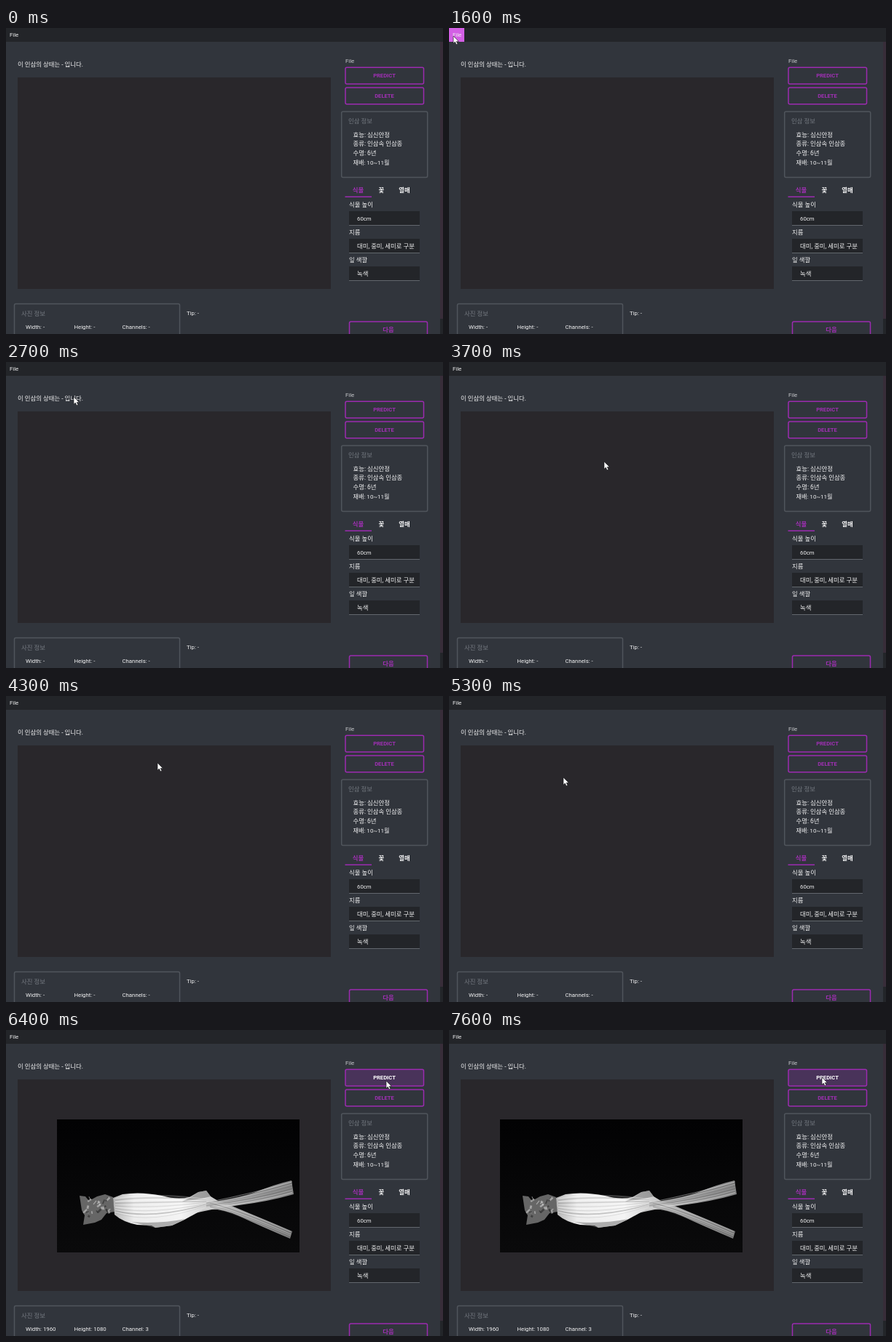
An HTML page that plays this animation: 600 by 421 pixels, repeating every 8 s.

```html
<!DOCTYPE html>
<html lang="ko">
<head>
<meta charset="utf-8">
<title>인삼 정보</title>
<style>
  html, body { margin: 0; width: 100%; height: 100%; overflow: hidden; background: #31353c; }
  svg { display: block; width: 100vw; height: 100vh; }
  text { font: 7.8px Roboto, "Noto Sans CJK KR", "Noto Sans CJK", sans-serif; fill: #f2f2f3; }
  .ko { font-size: 8.4px; }
  .dim { fill: #747980; }
  .soft { fill: #c9cbce; }
  .bold { font-weight: 700; text-anchor: middle; }
  .accent { fill: #a030b4; }
  .dark { fill: #232529; }
  .group { fill: none; stroke: #50555c; stroke-width: 1.5; }
  .button rect { fill: transparent; stroke: #9c2bb0; stroke-width: 1.5; }
  .button text { fill: #a030b4; font-size: 7.6px; }
  .button.hover rect { fill: #49335a; }
  .button.hover text { fill: #fff; }
  .line { stroke: #62676d; }
</style>
</head>
<body>
<svg viewBox="0 0 600 421">
  <defs>
    <linearGradient id="backdrop" x2="0" y2="1">
      <stop stop-color="#020203"/><stop offset="1" stop-color="#0a0a0b"/>
    </linearGradient>
    <linearGradient id="flesh">
      <stop stop-color="#b5b5b5"/><stop offset=".2" stop-color="#ececec"/>
      <stop offset=".65" stop-color="#f4f4f4"/><stop offset="1" stop-color="#c4c4c4"/>
    </linearGradient>
    <linearGradient id="branch">
      <stop stop-color="#f0f0f0"/><stop offset=".4" stop-color="#c2c2c2"/><stop offset="1" stop-color="#8c8c8c"/>
    </linearGradient>
    <filter id="soften"><feGaussianBlur stdDeviation=".7"/></filter>
    <clipPath id="photoArea"><rect x="70" y="123" width="333" height="183"/></clipPath>
  </defs>

  <rect width="600" height="421" fill="#31353c"/>
  <rect class="dark" width="600" height="19"/>
  <rect x="596" y="19" width="4" height="381" fill="#382d39"/>
  <rect class="dark" x="596" y="400" width="4" height="21"/>
  <rect id="fileHover" width="21" height="19" fill="#d35fe5"/>
  <text x="5" y="12">File</text>

  <text class="ko" x="16" y="52.7">이 인삼의 상태는 - 입니다.</text>
  <rect x="16" y="68" width="430" height="291" fill="#29272b"/>

  <g id="photo" clip-path="url(#photoArea)">
    <rect x="70" y="123" width="333" height="183" fill="url(#backdrop)"/>
    <g filter="url(#soften)">
      <path fill="#666" d="M101 228L109 229L114 235L125 229L136 226L147 230L149 250L138 252L131 261L122 265L106 268L108 255L104 248Z"/>
      <g id="crown" fill="none"/>
      <path fill="url(#branch)" opacity=".85" d="M270 236Q290 232 310 242L393 277L390 287Q350 270 320 256Q295 244 270 247Z"/>
      <path fill="url(#branch)" opacity=".92" d="M236 240Q300 238 340 224Q370 212 392 207L395 226Q360 236 320 241Q275 247 236 258Z"/>
      <path fill="url(#flesh)" d="M147 231L160 226Q185 222 214 228Q235 234 252 230L264 223L275 221L281 229L291 235Q262 252 245 261L228 269L205 272L200 269L180 268Q160 264 149 254Z"/>
      <path fill="#777" opacity=".6" d="M252 231L264 223L275 221L281 229Q266 233 242 236Z"/>
      <path fill="#777" opacity=".55" d="M172 264L205 272L228 269L246 260Q210 267 172 264Z"/>
      <g id="fibres" fill="none"/>
    </g>
  </g>

  <text class="soft" x="466" y="48">File</text>
  <g id="predict" class="button">
    <rect x="466" y="54.2" width="107.5" height="22.8" rx="2"/>
    <text class="bold" x="519.5" y="68.4">PREDICT</text>
  </g>
  <g id="delete" class="button">
    <rect x="466" y="82" width="107.5" height="22.8" rx="2"/>
    <text class="bold" x="519.5" y="96.2">DELETE</text>
  </g>

  <rect class="group" x="460.7" y="115" width="118" height="90.5" rx="2"/>
  <text class="ko dim" x="470" y="131">인삼 정보</text>
  <text class="ko" x="476.5" y="149.5">효능: 심신안정</text>
  <text class="ko" x="476.5" y="162.3">종류: 인삼속 인삼종</text>
  <text class="ko" x="476.5" y="175">수명: 6년</text>
  <text class="ko" x="476.5" y="187.7" style="font-size:8.1px">재배: 10~11월</text>

  <text class="ko bold accent" x="483.5" y="226.2">식물</text>
  <text class="ko bold" x="515.3" y="226.2">꽃</text>
  <text class="ko bold" x="547" y="226.2">열매</text>
  <path d="M465.5 232.3H502" stroke="#9c2bb0" stroke-width="1.4"/>
  <g id="fields"></g>

  <rect class="group" x="11.5" y="379.5" width="227" height="60" rx="2"/>
  <text class="ko dim" x="21" y="396">사진 정보</text>
  <text id="width" x="27" y="414.3"></text>
  <text id="height" x="93.5" y="414.3"></text>
  <text id="channels" x="159.5" y="414.3"></text>
  <text x="248" y="394.8">Tip: -</text>
  <g class="button">
    <rect x="471.5" y="404" width="107" height="24" rx="2"/>
    <text class="bold" x="525" y="418" style="font-size:8.4px">다음</text>
  </g>

  <path id="cursor" fill="#fff" stroke="#151518" stroke-width=".6"
    d="M0 0V10.2L2.3 8.1L4 11.8L5.9 11L4.2 7.4H7.4Z"/>
</svg>
<script>
const $ = id => document.getElementById(id);
const LOOP = 8000, MENU_OPEN = 1600, MENU_CLOSE = 2600, PHOTO = 5600;

// Cursor poses, each held until the next: time, x, y
const poses = [
  [1600, 6, 11], [1900, 8, 14], [2000, 10, 19], [2200, 14, 26], [2400, 16, 29],
  [2600, 30, 32], [2700, 93, 48], [2800, 225, 85], [2900, 322, 104],
  [3100, 300, 112], [3200, 246, 122], [3400, 218, 123], [3700, 213, 137],
  [3900, 212, 135], [4100, 211, 125], [4200, 209, 105], [4300, 208, 92],
  [5000, 169, 108], [5300, 157, 112], [5700, 165, 116], [5800, 215, 125],
  [5900, 310, 130], [6000, 410, 120], [6100, 475, 100], [6200, 500, 90],
  [6400, 522, 70], [6500, 528, 64], [7000, 518, 63], [7100, 511, 65], [7600, 512, 65]
];

const fields = [['식물 높이', '60cm'], ['지름', '대미, 중미, 세미로 구분'], ['잎 색깔', '녹색']];
$('fields').innerHTML = fields.map(([label, value], i) => {
  const y = 252 + i * 38;
  return `<text class="ko" x="471" y="${y - 6}">${label}</text>
    <rect class="dark" x="471" y="${y}" width="97" height="19.5"/>
    <path class="line" d="M471 ${y + 19.5}h97"/>
    <text class="${i ? 'ko' : ''}" x="482" y="${y + 12.8}">${value}</text>`;
}).join('');

let seed = 7;
const random = () => (seed = seed * 16807 % 2147483647) / 2147483647;
const stroke = (d, color, width, opacity) =>
  `<path d="${d}" stroke="${color}" stroke-width="${width}" opacity="${opacity}"/>`;

function fibres(count, curve, tones) {
  let out = '';
  for (let i = 0; i < count; i++) {
    out += stroke(curve((i + random()) / count), tones[i % 2], 0.6 + random() * 1.4, 0.15 + random() * 0.3);
  }
  return out;
}

$('fibres').innerHTML =
  fibres(12, k => `M150 ${232 + 21 * k}Q200 ${223 + 48 * k} 275 ${233 + 9 * k}`, ['#fff', '#888']) +
  fibres(9, k => `M275 ${237 + 8 * k}Q340 ${224 + 16 * k} 393 ${208 + 17 * k}`, ['#eee', '#555']) +
  fibres(6, k => `M280 ${236 + 8 * k}Q315 ${243 + 10 * k} 391 ${277 + 9 * k}`, ['#ddd', '#555']);

let crown = '';
for (let i = 0; i < 26; i++) {
  const x = 107 + random() * 34, y = 234 + random() * (x < 128 ? 26 : 14);
  crown += stroke(`M${x} ${y}l${random() * 10 - 5} ${random() * 12 - 6}`, i % 3 ? '#d8d8d8' : '#222', 1 + random() * 2, 0.55);
}
$('crown').innerHTML = crown;

const show = (id, on) => { $(id).style.display = on ? '' : 'none'; };

function draw(t) {
  const pose = poses.filter(p => p[0] <= t).pop();
  show('cursor', pose);
  const [, x, y] = pose || [0, -99, -99];
  $('cursor').setAttribute('transform', `translate(${x} ${y})`);

  show('fileHover', t >= MENU_OPEN && t < MENU_CLOSE);
  const over = (id, top) =>
    $(id).classList.toggle('hover', x > 465 && x < 574 && y > top && y < top + 24);
  over('predict', 54);
  over('delete', 81);

  const loaded = t >= PHOTO;
  show('photo', loaded);
  $('width').textContent = loaded ? 'Width: 1960' : 'Width: -';
  $('height').textContent = loaded ? 'Height: 1080' : 'Height: -';
  $('channels').textContent = loaded ? 'Channel: 3' : 'Channels: -';
}

const start = performance.now();
function tick() {
  draw((performance.now() - start) % LOOP);
  requestAnimationFrame(tick);
}
tick();
</script>
</body>
</html>
```
